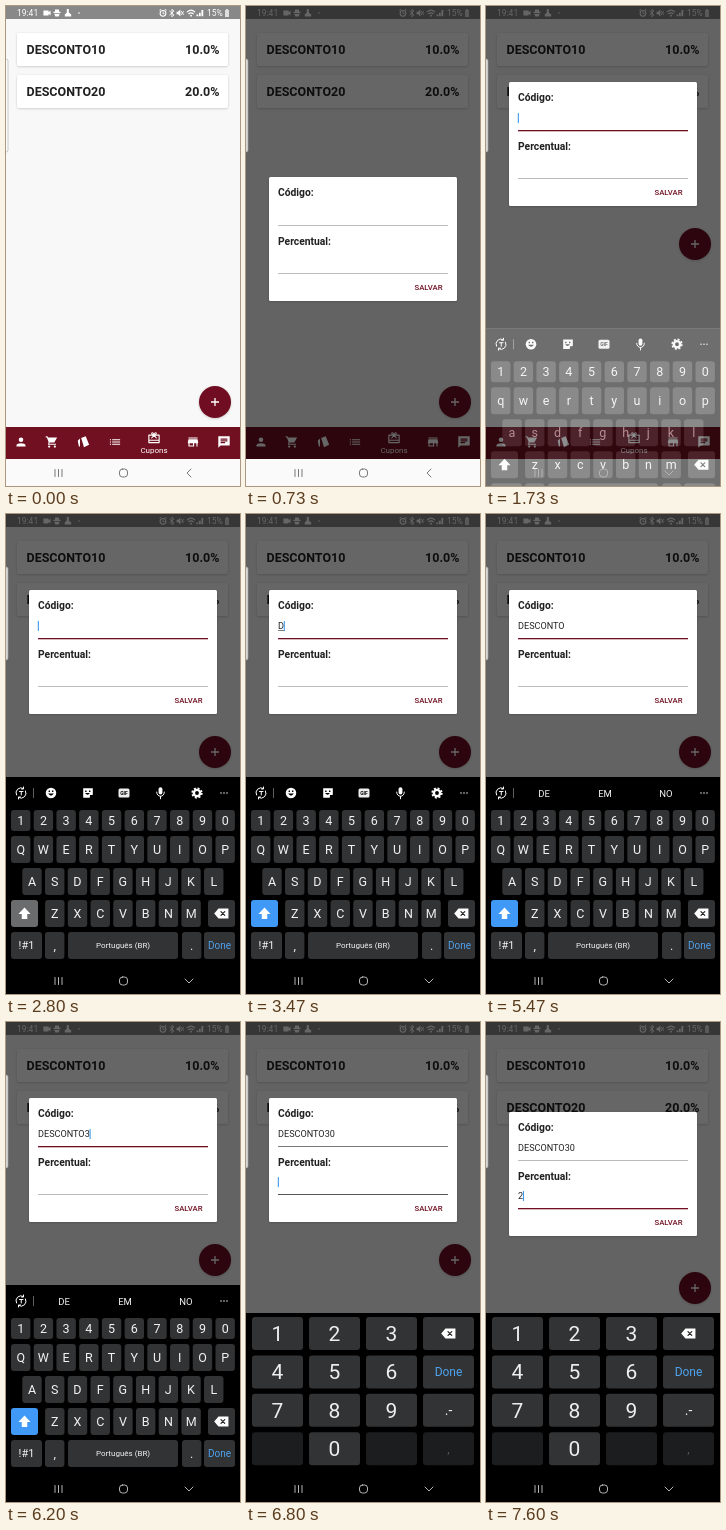
Write an HTML page that moves like this. It is 234 px wide and 480 px high and loops after 8 s.

```html
<!DOCTYPE html>
<html lang="pt-BR">
<head>
<meta charset="utf-8">
<title>Cupons</title>
<style>
html, body { margin: 0; width: 100%; height: 100%; overflow: hidden; background: #f8f8f8; }
svg { display: block; width: 100vw; height: 100vh; font-family: Roboto, sans-serif; }
.line { fill: none; stroke: currentColor; stroke-linecap: round; stroke-linejoin: round; }
.b { font-weight: 700; fill: #202020; }
</style>
</head>
<body>
<svg id="stage" viewBox="0 0 234 480"></svg>
<script>
const stage = document.getElementById('stage');
const WINE = '#701021', KEY = '#323334', LIT = '#6b6c6d', BLUE = '#4098f7';

// Markup helpers
const rect = (x, y, w, h, fill, more = '') => `<rect x="${x}" y="${y}" width="${w}" height="${h}" fill="${fill}" ${more}/>`;
const text = (x, y, s, size, fill, more = '') => `<text x="${x}" y="${y}" font-size="${size}" fill="${fill}" ${more}>${s}</text>`;
const mid = (x, cy, s, size, fill, more = '') => text(x, cy + size * .356, s, size, fill, 'text-anchor="middle" ' + more);
const line = (d, w = 1, more = '') => `<path class="line" d="${d}" stroke-width="${w}" ${more}/>`;
const icon = (x, y, scale, body) => `<g transform="translate(${x} ${y}) scale(${scale}) translate(-12 -12)" color="#fff" fill="#fff">${body}</g>`;
const fill = d => `<path fill-rule="evenodd" d="${d}"/>`;

const card = (y, name, pct) =>
  rect(11, y, 211, 33, '#fff', 'rx="2" filter="url(#soft)"') +
  text(20.5, y + 21, name, 12.5, '#202020', 'class="b"') +
  text(213.5, y + 21, pct, 12.5, '#202020', 'class="b" text-anchor="end"');

const statusBar = () => rect(0, 0, 234, 13, '#888') +
  text(11, 10, '19:41', 8.5, '#fff') +
  icon(41, 7, .4, fill('M3 6h13v4l5-4v12l-5-4v4H3z')) +
  icon(51, 7, .4, fill('M7 3h10v6h4v3H3V9h4zM5 14h14l-3 7H8z')) +
  icon(62, 7, .4, fill('M9 2h5v9l6 5v5H4v-5l5-5z')) +
  '<circle cx="73" cy="7" r=".8" fill="#fff"/>' +
  icon(157, 7, .36, '<circle class="line" cx="12" cy="13" r="8" stroke-width="3"/>' + line('M12 9v5h3M3 4l3-2M21 4l-3-2', 2.5)) +
  icon(166, 7, .38, line('M6 7l11 10-5 5V2l5 5L6 17', 2.4)) +
  icon(174, 7, .38, fill('M3 9h4l6-6v18l-6-6H3z') + line('M16 8l5 8M21 8l-5 8', 2.4)) +
  icon(185, 7, .38, line('M2 9q10-9 20 0M6 14q6-5 12 0', 3) + '<circle cx="12" cy="19" r="2.5"/>') +
  icon(194, 7, .36, fill('M2 21h5v-5H2zM9 21h5V11H9zM16 21h5V4h-5z')) +
  text(201, 10, '15%', 8.5, '#fff') +
  rect(219, 4, 4, 7, '#ddd') + rect(220, 3, 2, 1, '#ddd');

const tabs = () => rect(0, 421, 234, 32, WINE) + [
  [15, fill('M12 4a4 4 0 1 1 0 8a4 4 0 1 1 0-8M4 20v-2c0-5 16-5 16 0v2z')],
  [46, fill('M1 2h3l1 2h16l-5 9H8l-1 2h12v2H5l1-5L3 4H1zM7 18a2 2 0 1 1 0 4a2 2 0 1 1 0-4M17 18a2 2 0 1 1 0 4a2 2 0 1 1 0-4')],
  [78, fill('M7 5l8-3 6 15-9 4zM5 6v14H3L1 10z')],
  [109, fill('M3 7h2v2H3zM7 7h14v2H7zM3 11h2v2H3zM7 11h14v2H7zM3 15h2v2H3zM7 15h14v2H7z')],
  [148, line('M3 7h18v13H3zM3 16h18M8 12l4-5 4 5', 2) + line('M12 6c-5 1-5-4-2-3q2 1 2 3q0-2 2-3c3-1 3 4-2 3', 1.8), 432],
  [187, fill('M4 4h16v2H4zM4 7h16l1 5v2h-1v6h-2v-6h-4v6H4v-6H3v-2zM6 14v4h6v-4z')],
  [218, fill('M2 2h20v16H6l-4 4zM6 6v2h12V6zM6 9v2h12V9zM6 12v2h8v-2z')]
].map(([x, body, y = 436]) => icon(x, y, .57, body)).join('') + text(148, 447, 'Cupons', 8, '#fff', 'text-anchor="middle"');

// Keyboards
const key = (id, x, y, w, h, label, size = 12.5, color = '#f2f2f2', bg = KEY) =>
  rect(x, y, w, h, bg, `rx="3" data-key="${id}"`) + mid(x + w / 2, y + h / 2, label, size, color);
const spots = {};
const keyRow = (chars, cx, y, h) => [...chars].map((c, i) => {
  const x = cx + i * 22.72;
  spots[c] = [x, y + h / 2];
  return key(c, x - 9.7, y, 19.4, h, c);
}).join('');
const erase = (x, y) => icon(x, y, .62, fill('M8 4h16v16H8l-7-8z') + '<path class="line" d="M12 9l6 6M18 9l-6 6" style="stroke:#222" stroke-width="2"/>');

const tools = () => icon(45, 279, .48, '<circle cx="12" cy="12" r="11"/>' + '<path d="M6 13h12q-6 9-12 0zM7 7h3v3H7zM14 7h3v3h-3z" fill="#000"/>') +
  icon(82, 279, .48, fill('M2 2h20v13l-7 7H2z') + '<path d="M6 12h10q-5 7-10 0zM6 7h3v3H6zM14 7h3v3h-3zM16 22v-6h6z" fill="#000"/>') +
  rect(112.5, 274.5, 11, 9, '#eee', 'rx="1.5"') + mid(118, 279, 'GIF', 5, '#000', 'font-weight="700"') +
  icon(154.5, 279, .48, '<rect x="8" y="0" width="8" height="15" rx="4"/>' + line('M4 10c0 12 16 12 16 0M12 19v5', 2)) +
  icon(191, 279, .48, '<circle class="line" cx="12" cy="12" r="6.5" stroke-width="5"/><circle class="line" cx="12" cy="12" r="10" stroke-width="3.5" style="stroke-linecap:butt" stroke-dasharray="4.2 3.65"/>');

const letters = () => rect(0, 263, 234, 360, '#000') +
  icon(15, 279, .5, line('M3 16a10 10 0 0 1 14-13M21 8a10 10 0 0 1-14 13M17 0v4h-4M7 24v-4h4', 2) + line('M9 9h7M12.5 9v7', 2)) +
  rect(27, 274, .8, 10, '#777') +
  `<g id="tools">${tools()}</g><g id="words">${[58, 119, 180].map(x => mid(x, 279.5, '', 9.5, '#f2f2f2')).join('')}</g>` +
  [215, 218, 221].map(x => `<circle cx="${x}" cy="279" r=".8" fill="#ddd"/>`).join('') +
  keyRow('1234567890', 14.7, 296, 21) +
  '<g id="abc">' + keyRow('QWERTYUIOP', 14.7, 322, 27) + keyRow('ASDFGHJKL', 26, 354, 27) + keyRow('ZXCVBNM', 48.8, 386, 27) + '</g>' +
  key('shift', 5, 386, 27, 27, '') + icon(18.5, 399.5, .55, fill('M12 1l11 12h-6v9H7v-9H1z')) +
  key('back', 202, 386, 27, 27, '') + erase(215, 399.5) +
  key('sym', 5, 418, 31, 27, '!#1', 11) + key('comma', 39, 418, 19.4, 27, ',') +
  key('space', 62, 418, 110, 27, 'Português (BR)', 8) + key('dot', 176, 418, 19.4, 27, '.') +
  key('done', 198, 418, 31, 27, 'Done', 10, '#4ea3f0') +
  `<g id="popup">${rect(-15.5, -59, 31, 39, '#202122', 'rx="5"')}${mid(0, -40, '', 20, '#fff')}</g>`;

const padKey = (c, r, label, size, color, bg) => key('n' + label, 6 + c * 57, 295 + r * 38.4, 51, 33, label, size, color, bg);
const numbers = () => rect(0, 291, 234, 189, '#000') +
  [...'123456789'].map((n, i) => padKey(i % 3, Math.floor(i / 3), n, 21, '#eee')).join('') +
  padKey(3, 0, '', 12) + erase(202, 311.5) + padKey(3, 1, 'Done', 12, '#4ea3f0') + padKey(3, 2, '.-', 14) +
  padKey(0, 3, '', 12, '', '#1c1d1e') + padKey(1, 3, '0', 21, '#eee') +
  padKey(2, 3, '', 12, '', '#1c1d1e') + padKey(3, 3, ',', 12, '#555', '#1c1d1e');

const field = (id, y) => `<g id="${id}">${text(32, y, '', 9.1, '#222')}${rect(32, y + 1.3, 0, .7, '#444')}` +
  `${rect(31.8, y - 8, 1.1, 10, '#3d9bea')}${rect(32, y + 9, 170, 1, '#bbb')}</g>`;

stage.innerHTML = `<defs><filter id="soft" x="-20%" y="-20%" width="140%" height="150%">
  <feDropShadow dx="0" dy=".7" stdDeviation=".9" flood-opacity=".2"/></filter></defs>` +
  rect(0, 0, 234, 480, '#f8f8f8') + card(27, 'DESCONTO10', '10.0%') + card(69, 'DESCONTO20', '20.0%') +
  statusBar() + tabs() + rect(0, 453, 234, 27, '#fafafa') +
  `<g id="fab"><circle cx="209" r="16" fill="${WINE}" filter="url(#soft)"/><path d="M205 0h8M209-4v8" stroke="#fff" stroke-width="1.3"/></g>` +
  rect(0, 0, 234, 453, '#000', 'id="dim"') +
  rect(-3, 53, 5, 93, '#fff', 'rx="2" fill-opacity=".75" stroke="#aaa" stroke-width=".6"') +
  `<g id="dialog">${rect(23, 0, 188, 124, '#fff', 'rx="1.5" filter="url(#soft)"')}` +
  text(32, 19, 'Código:', 10.3, '', 'class="b"') + field('code', 39) +
  text(32, 67.5, 'Percentual:', 10.3, '', 'class="b"') + field('rate', 87) +
  text(196.5, 113.2, 'SALVAR', 7.75, WINE, 'font-weight="500" text-anchor="end"') + '</g>' +
  `<g id="kb">${letters()}</g><g id="pad">${numbers()}</g>` +
  `<g id="sys">${line('M49 463.5v7M52.5 463.5v7M56 463.5v7')}<rect class="line" x="113.5" y="463" width="8" height="8" rx="3"/>${line('M185 463l-4 4 4 4', 1, 'id="back"')}</g>`;

const $ = s => stage.querySelector(s);
const set = (el, attrs) => { for (const k in attrs) el.setAttribute(k, attrs[k]); };
const show = (el, on) => el.setAttribute('display', on ? 'inline' : 'none');
const put = (el, s) => { if (el.textContent !== s) el.textContent = s; };
const keys = [...stage.querySelectorAll('[data-key]')].map(el => [el, el.dataset.key, el.getAttribute('fill')]);
const abc = [...stage.querySelectorAll('#abc text')].map(el => [el, el.textContent]);
const words = [...stage.querySelectorAll('#words text')];

// Value of the last step that has begun
const at = (t, ...steps) => steps.reduce((v, [from, next]) => t >= from ? next : v, steps[0][1]);
const ramp = (t, a, b) => Math.max(0, Math.min(1, (t - a) / (b - a)));

function drawField(id, value, caret, composing, stroke, gap = 0) {
  const [label, under, cursor, rule] = $('#' + id).children;
  put(label, value);
  const w = value ? label.getComputedTextLength() : 0;
  set(under, { width: composing ? w : 0 });
  set(cursor, { x: 31.8 + w + gap });
  show(cursor, caret);
  set(rule, { fill: stroke, height: stroke === WINE ? 1.3 : 1 });
}

function render(t) {
  const fade = ramp(t, 70, 730), open = fade * fade * (3 - 2 * fade);
  const p = 1 - (1 - ramp(t, 1600, 1930)) ** 1.6;
  const slide = 133 * (1 - p), numeric = t >= 6730;
  const bottom = at(t, [0, 453], [1670, 263], [6870, 291]);

  set($('#dim'), { opacity: .6 * open, height: t < 1600 ? 453 : numeric ? 291 : 263 + slide });
  set($('#dialog'), { opacity: open, transform: `translate(0 ${(13 + bottom) / 2 - 62})` });
  set($('#fab'), { transform: `translate(0 ${bottom === 453 ? 396 : bottom - 25})` });

  const caret = at(t, [0, false], [1530, true], [1930, false], [2470, true], [4530, false], [4800, true],
    [5470, false], [5730, true], [7270, false], [7470, true]);
  const value = at(t, [0, ''], [3400, 'D'], [3600, 'DE'], [3800, 'DES'], [4130, 'DESC'], [4870, 'DESCONTO'],
    [6130, 'DESCONTO3'], [6330, 'DESCONTO30']);
  drawField('code', value, caret && t < 6670, t < 4870,
    at(t, [0, '#bbb'], [1530, WINE], [6670, '#777'], [6870, '#bbb']), t >= 4870 && t < 5800 ? 2.3 : 0);
  drawField('rate', t >= 7530 ? '2' : '', caret && t >= 6670, false,
    at(t, [0, '#bbb'], [6670, '#555'], [6870, WINE]));

  const down = at(t, [0, ''], [2800, 'shift'], [2930, ''], [3330, 'D'], [3400, ''], [3530, 'E'], [3600, ''],
    [3730, 'S'], [3800, ''], [4070, 'C'], [4130, ''], [5730, 'back'], [5870, ''], [6070, '3'], [6130, ''],
    [6270, '0'], [6330, ''], [7470, 'n2'], [7570, '']);
  for (const [el, id, base] of keys)
    set(el, { fill: id === down ? LIT : id === 'shift' && t >= 2930 ? BLUE : base });
  for (const [el, c] of abc) put(el, t < 2800 ? c.toLowerCase() : c);

  const next = at(t, [0, ''], [4200, 'DESCE DESDE DESCONTO'], [4530, 'DESDE DESCE DESCONTO'], [4870, 'DE EM NO'],
    [5870, 'DESDE DE COM'], [6130, 'DE EM NO'], [6470, 'DESDE EM REAIS']);
  show($('#tools'), !next);
  next.split(' ').forEach((w, i) => put(words[i], w));
  if (!next) words.forEach(el => put(el, ''));

  const popup = $('#popup'), tap = /^[A-Z]$/.test(down);
  show(popup, tap);
  if (tap) {
    put(popup.lastChild, down);
    set(popup, { transform: `translate(${spots[down].join(' ')})` });
  }

  set($('#kb'), { opacity: p, transform: `translate(0 ${slide})` });
  show($('#kb'), p > 0 && !numeric);
  show($('#pad'), numeric);
  set($('#sys'), { color: p > 0 ? '#b5b5b5' : '#777' });
  set($('#back'), { transform: p > 0 ? 'rotate(-90 183 467)' : '' });
}

function tick() {
  render(performance.now() % 8000);
  requestAnimationFrame(tick);
}
tick();
</script>
</body>
</html>
```
